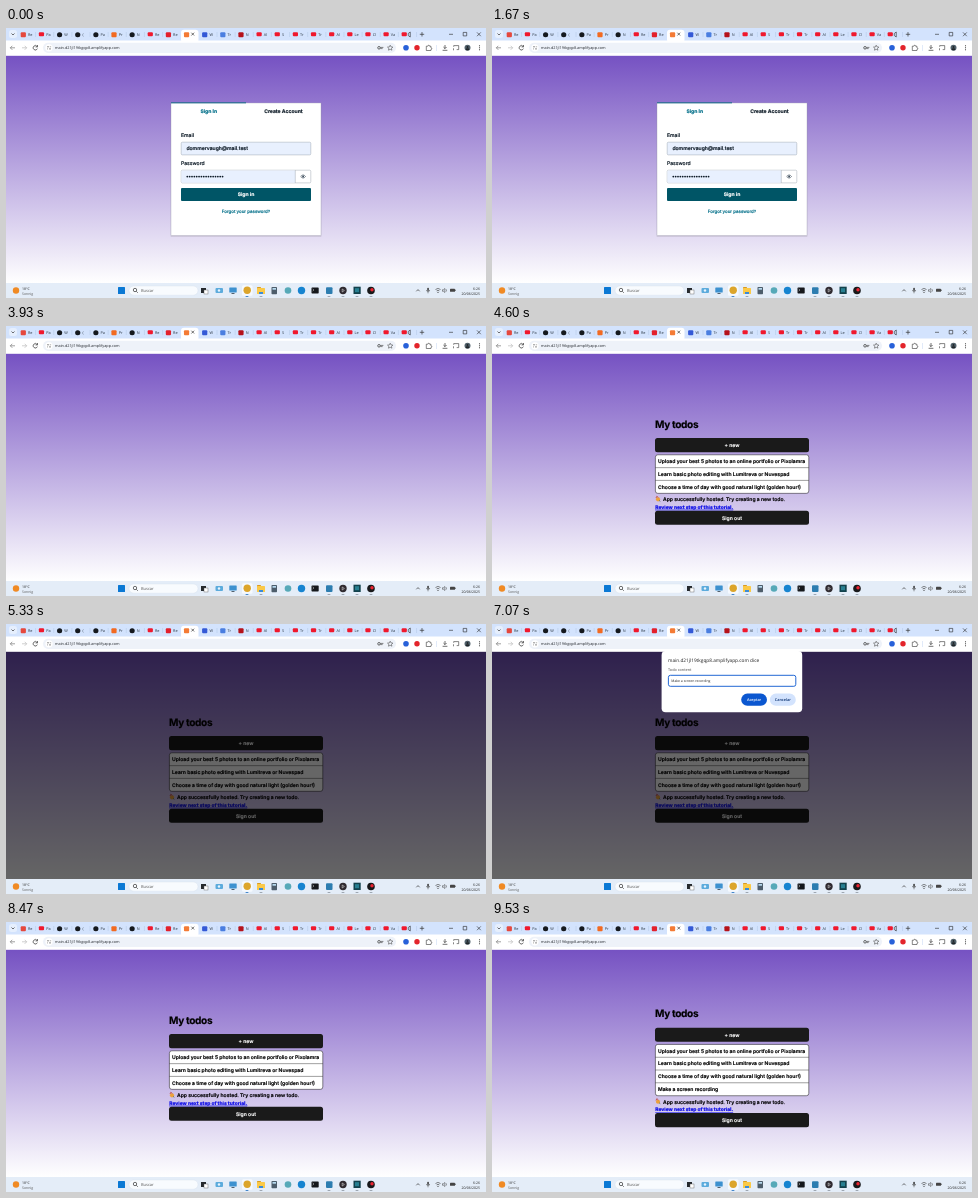
An HTML page that plays this animation: 480x270 px, repeating every 9990 ms.

```html
<!DOCTYPE html>
<html lang="en">
<head>
<meta charset="utf-8">
<title>Todo app walkthrough</title>
<style>
  html, body { margin: 0; width: 100%; height: 100%; overflow: hidden; }
  svg { display: block; width: 100%; height: 100%; }
  text { font: 600 5.06px Inter, sans-serif; stroke-width: .16; white-space: pre; text-rendering: geometricPrecision; }
  .ui text { font: 400 3.8px "Open Sans", sans-serif; stroke-width: 0; }
</style>
</head>
<body>
<svg id="stage" viewBox="0 0 480 270">
  <defs>
    <linearGradient id="sky" x2="0" y2="1">
      <stop stop-color="#7551c2"/><stop offset="1" stop-color="#fff"/>
    </linearGradient>
  </defs>
</svg>
<script>
const LOOP = 9990;
const TIMES = { loginEnd: 2960, todosStart: 4500, dim: 5300, dialog: 5430,
                typeStart: 5800, typeEnd: 7030, dialogEnd: 8400, added: 9480 };
const NEW_TODO = 'Make a screen recording';
const TODOS = [
  'Upload your best 5 photos to an online portfolio or Pixolamra',
  'Learn basic photo editing with Lumitreva or Nuvespad',
  'Choose a time of day with good natural light (golden hour!)',
  NEW_TODO
];
const HOST = 'main.d21jl19tkgqp8.amplifyapp.com';

const rect = (x, y, w, h, fill, r = 0, more = '') =>
  `<rect x="${x}" y="${y}" width="${w}" height="${h}" rx="${r}" fill="${fill}" ${more}/>`;
const dot = (x, y, r, fill, more = '') => `<circle cx="${x}" cy="${y}" r="${r}" fill="${fill}" ${more}/>`;
const line = (d, color = '#333', width = .7) =>
  `<path d="${d}" fill="none" stroke="${color}" stroke-width="${width}"/>`;
const text = (x, y, content, fill = '#000', style = '', anchor = 'start') =>
  `<text x="${x}" y="${y}" fill="${fill}" stroke="${fill}" text-anchor="${anchor}" style="${style}">${content}</text>`;
const centered = (x, y, content, fill, style) => text(x, y, content, fill, style, 'middle');
const group = (id, content, cls = '') => `<g id="${id}" class="${cls}">${content}</g>`;

function tabStrip() {
  const red = '#f0182d', ink = '#15191e';
  const icons = ['#e5483d', red, ink, ink, ink, '#f26a21', ink, red, '#e3202c', '#f47b35',
                 '#3459d6', '#4a7ee0', '#b5121b', ...Array(9).fill(red)];
  const titles = 'Re Pa W ( Pa Pr N Re Re . W Tr N Al S Tr Tr Al Le Cl Va .'.split(' ');
  let out = rect(0, 0, 480, 13, '#d3e3fd') + rect(3, 2, 8, 8, '#e6effd', 2.5) +
            line('M5.5 5.5l1.5 1.5l1.5-1.5') + rect(175, 1.8, 17.5, 13, '#fff', 3);
  icons.forEach((color, i) => {
    const x = 17.3 + i * 18.14;
    out += rect(x - 2.6, 4.3, 5.2, color === red ? 4 : 5, color, color === ink ? 2.5 : 1);
    if (i === 9) out += line(`M${x + 4.8} 4.7l2.8 2.8m0-2.8l-2.8 2.8`);
    else if (i === 21) out += line(`M${x + 4} 5.5v2l2 1.5v-5z`, '#222', .6);
    else out += text(x + 4.7, 8, titles[i], '#25313d');
    if (i !== 8 && i !== 9) out += line(`M${x + 12.3} 4v5`, '#a9bfdf', .4);
  });
  return out + line('M413.8 6.3h4.4m-2.2-2.2v4.4') +
    line('M443 6.3h4M457.2 4.4h3.5v3.5h-3.5zM471 4.4l3.8 3.8m0-3.8l-3.8 3.8', '#222', .6);
}

function toolbar() {
  return rect(0, 12.5, 480, 15.3, '#fff') + rect(37, 14.7, 353, 10.2, '#eef2f9', 5.1) +
    line('M9 19.8H4.3m2-2l-2 2l2 2', '#777') + line('M16 19.8h4.7m-2-2l2 2l-2 2', '#bbb') +
    line('M31.2 18.6a2.2 2.2 0 1 0 .2 2M31.5 17v1.9h-2') +
    dot(43, 19.8, 3.6, '#fff') + line('M41 18.8h2.2M44.3 18.8h.8M41 20.9h.8M43 20.9h2', '#444', .6) +
    text(49, 21.4, HOST, '#1f2329') +
    dot(373, 19.8, 1.3, 'none', 'stroke="#333" stroke-width=".7"') + line('M374.4 19.4h3M374.4 20.6h2.2', '#333', .6) +
    line('M384.2 17.2l.8 1.7l1.9.2l-1.4 1.3l.4 1.8l-1.7-.9l-1.7.9l.4-1.8l-1.4-1.3l1.9-.2z', '#333', .5) +
    dot(400, 19.8, 2.8, '#2861d9') + dot(411, 19.8, 2.7, '#e3242b') +
    line('M420.3 18.2h1.5a.9.9 0 0 1 1.8 0h1.3v1.5a.9.9 0 0 1 0 1.8v1h-4.6z', '#333', .6) +
    line('M430.5 17v6', '#c2d5f2', .5) + line('M439 17v3.5m-1.6-1.5l1.6 1.6l1.6-1.6M436.6 22.3h4.8') +
    line('M447.7 18.8v-1.2h5v4h-2M447.5 22.3v-2', '#333', .6) +
    dot(461.5, 19.8, 3, '#51616b') + dot(461.5, 18.9, 1, '#20262a') + rect(459.8, 20.2, 3.4, 2, '#20262a', 1) +
    [17.8, 19.8, 21.8].map(y => dot(473.5, y, .55, '#222')).join('');
}

function taskbar() {
  const small = 'font-size:3.5px';
  let out = rect(0, 255, 480, 15, '#e4edf8') + dot(10, 262.5, 3.2, '#f08a24') +
    text(16, 261.6, '18°C', '#222', small) + text(16, 266.6, 'Sonnig', '#555', small) +
    rect(112, 259, 7, 7, '#0a78d4', .5) +
    rect(123, 258, 69, 9.2, '#f8fbfe', 4.6, 'stroke="#d5dfeb" stroke-width=".4"') +
    dot(129, 262, 1.7, 'none', 'stroke="#333" stroke-width=".7"') + line('M130.3 263.3l1.5 1.5') +
    text(135, 264.2, 'Buscar', '#555', 'font-size:4px');
  out += rect(195, 260, 5, 5, '#25292d') + rect(198, 262, 4, 4, '#fff', 0, 'stroke="#555" stroke-width=".4"');
  out += rect(209.5, 260, 7.5, 5, '#5cabdc', 1) + dot(213, 262.5, 1.2, '#e8f5ff');
  out += rect(223.3, 259.5, 7.4, 5, '#3d91cf', .6) + rect(225.5, 265, 3, 1, '#52616f');
  out += rect(236, 257.2, 10.5, 10.5, '#f5f9fe', 1.5) + dot(241.2, 262.3, 3.7, '#dca52b');
  out += rect(251, 259, 4, 3, '#d99a1f', .6) + rect(251, 260, 8, 6, '#fbc947', .6) + rect(253, 264, 4, 2, '#3a8bd8');
  out += rect(265.5, 259, 5.5, 7.2, '#4d5d6b', .7) + rect(266.5, 260, 3.5, 1.7, '#b8dbf0');
  out += dot(282, 262.5, 3.3, '#56a9b8') + dot(295.5, 262.5, 3.7, '#1684d0');
  out += rect(305.5, 259.4, 7.2, 6, '#15181c', .7) + line('M306.7 261l1.2 1l-1.2 1', '#fff', .5);
  out += rect(320, 259.3, 6.5, 6.8, '#2c7db0', 1) + dot(337, 262.5, 3.7, '#302b31') +
         line('M336.2 261l2.2 1.5l-2.2 1.5z', '#eee', .5);
  out += rect(347.5, 258.7, 7.2, 7.3, '#12414c') + rect(349, 260.2, 4, 4, '#277f91');
  out += dot(365, 262.5, 3.8, '#18191b') + dot(366, 261.7, 1.7, '#ed2532');
  for (const x of [241, 255, 323, 337, 351, 365])
    out += rect(x - 1.5, 268.2, 3, .7, x === 241 ? '#1267bd' : '#86909b', .35);
  return out + line('M410.3 263.3l1.7-1.7l1.7 1.7') + rect(421.3, 259.7, 1.5, 3.3, '#333', .7) +
    line('M420.5 262a1.6 1.6 0 0 0 3.2 0M422 263.8v1.5', '#333', .5) +
    line('M429.5 261.5q2.5-2.2 5 0M430.6 262.9q1.4-1.2 2.8 0', '#333', .6) + dot(432, 264.3, .6, '#333') +
    line('M436.5 261.7h1l1.3-1.2v4l-1.3-1.2h-1zM440 261.2q1 1.2 0 2.5', '#333', .5) +
    rect(444, 260.8, 5, 3, '#444', .6) + rect(449.3, 261.6, .6, 1.4, '#444') +
    text(474, 261.6, '6:26', '#222', small, 'end') + text(474, 266.7, '20/06/2025', '#222', small, 'end');
}

function login() {
  const field = 'stroke="#89949f" stroke-width=".4"';
  const ink = '#0d1a26', teal = '#04708a', label = 'font-weight:500', bold = 'font-weight:700';
  let out = rect(164.7, 75.2, 150.6, 133.6, '#000', 0, 'opacity=".12"') +
    rect(165, 75, 150, 132.5, '#fff', 0, 'stroke="#a9a9b8" stroke-width=".4"') +
    rect(165, 74.4, 75, .9, '#04687f') +
    centered(202.8, 84.6, 'Sign In', teal, bold) +
    centered(277.4, 84.6, 'Create Account', ink, bold) +
    text(175, 109.4, 'Email', ink, label) + rect(175.2, 114.2, 129.6, 12.7, '#e8f0fe', 1.2, field) +
    text(180.4, 122.4, 'dommervaugh@mail.test', ink) +
    text(175, 137.4, 'Password', ink, label) + rect(175.2, 142.2, 129.6, 12.7, '#fff', 1.2, field) +
    rect(175.4, 142.4, 113.8, 12.3, '#e8f0fe', 1) + line('M289.3 142.2v12.7', '#89949f', .4);
  for (let i = 0; i < 16; i++) out += dot(181.3 + i * 2.35, 148.6, .9, ink);
  return out + line('M294.7 148.5q2.4-3.1 4.8 0q-2.4 3.1-4.8 0z', '#304050', .6) + dot(297.1, 148.5, .9, '#304050') +
    rect(175, 160, 130, 13, '#005566', 1) + centered(240, 168.4, 'Sign in', '#fff', bold) +
    centered(240, 185.1, 'Forgot your password?', teal, 'font-size:4.43px;font-weight:500');
}

function todoList(count) {
  const rowHeight = 12.75;
  const height = count * rowHeight + .3;
  const shift = (3 - count) * rowHeight / 2;
  const button = (y, label) => rect(163, y, 154, 14.1, '#1a1a1a', 2.5) + centered(240, y + 8.9, label, '#fff');
  let out = text(163, 101.7, 'My todos', '#000', 'font-size:10.12px;font-weight:700;letter-spacing:-.035em') +
    button(112.1, '+ new') +
    rect(163.4, 128.8, 153.4, height, '#fff', 2.4, 'stroke="#111" stroke-width=".5"');
  TODOS.slice(0, count).forEach((todo, i) => {
    const y = 128.9 + i * rowHeight;
    if (i) out += line(`M163.4 ${y}h153.4`, '#111', .4);
    out += text(166, y + 8.2, todo);
  });
  const end = 128.8 + height;
  out += dot(166, end + 6, 2.1, '#eda23b') + line(`M164 ${end + 4.7}l.8-1.8l1.6 1.3`, '#c54b48', .9) +
    line(`M167 ${end + 7}l1.3 1`, '#52744d', .8) +
    text(171, end + 8.1, 'App successfully hosted. Try creating a new todo.') +
    text(163.3, end + 15.4, 'Review next step of this tutorial.', '#1010e8', 'font-weight:800;font-size:4.9px;text-decoration:underline') +
    button(end + 17.3, 'Sign out');
  return `<g transform="translate(0 ${shift})">${out}</g>`;
}

function dialog() {
  const bold = 'font-weight:600';
  return rect(169.6, 26.9, 140.6, 61.4, '#fff', 4) +
    text(176, 38.1, HOST + ' dice', '#1f1f1f', 'font-size:4.75px;font-weight:500') +
    text(176, 47, 'Todo content', '#444') +
    rect(176.4, 51.3, 127.4, 11, '#fff', 2, 'stroke="#0b57d0" stroke-width=".9"') +
    '<text id="typed" x="179.3" y="58" fill="#222" style="font-size:3.45px"></text>' +
    rect(249.2, 69.6, 25.8, 12.2, '#0b57d0', 6.1) + centered(262.1, 77.1, 'Aceptar', '#fff', bold) +
    rect(277.8, 69.6, 26, 12.2, '#d3e3fd', 6.1) + centered(290.8, 77.1, 'Cancelar', '#062e6f', bold);
}

const stage = document.getElementById('stage');
stage.innerHTML += rect(0, 27, 480, 228, 'url(#sky)') +
  group('login', login()) + group('before', todoList(3)) + group('after', todoList(4)) +
  group('shade', rect(0, 27, 480, 228, '#000', 0, 'opacity=".6"')) +
  group('chrome', tabStrip() + toolbar() + taskbar(), 'ui') + group('dialog', dialog(), 'ui');

const typedText = document.getElementById('typed');
const show = (id, visible) => { document.getElementById(id).style.display = visible ? '' : 'none'; };

function render() {
  const t = performance.now() % LOOP;
  const within = (start, end) => t >= start && t < end;
  show('login', t < TIMES.loginEnd);
  show('before', within(TIMES.todosStart, TIMES.added));
  show('after', t >= TIMES.added);
  show('shade', within(TIMES.dim, TIMES.dialogEnd));
  show('dialog', within(TIMES.dialog, TIMES.dialogEnd));

  const progress = (t - TIMES.typeStart) / (TIMES.typeEnd - TIMES.typeStart);
  const length = Math.max(0, Math.floor(progress * NEW_TODO.length));
  typedText.textContent = NEW_TODO.slice(0, length);
  requestAnimationFrame(render);
}
render();
</script>
</body>
</html>
```
